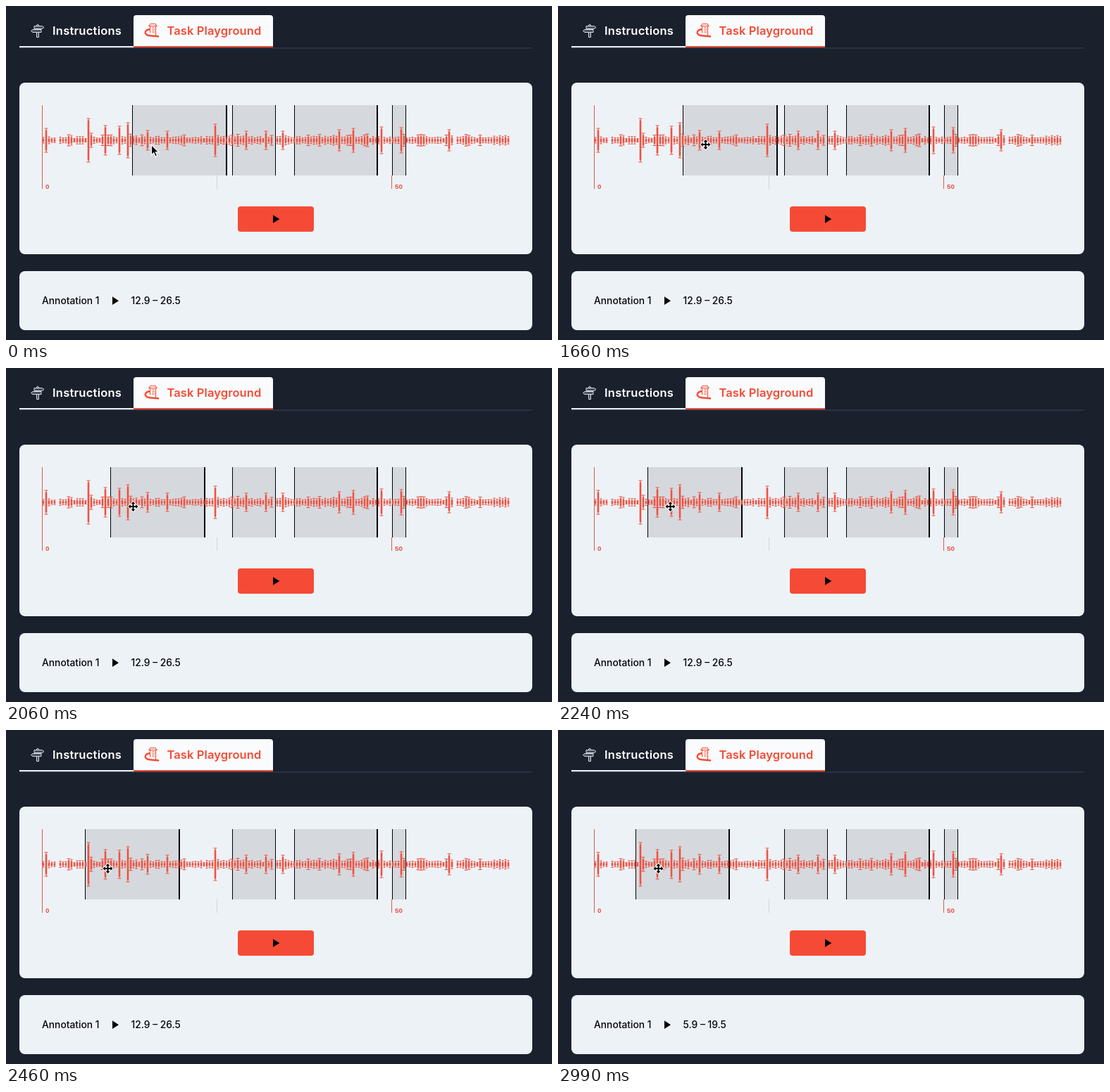
These frames come from a looping animation (775 by 475 pixels, 3.89 s). An HTML page:

```html
<!DOCTYPE html>
<html lang="en">
<head>
<meta charset="utf-8">
<title>Audio annotation</title>
<style>
  html, body { margin: 0; width: 100%; height: 100%; overflow: hidden; background: #1a202c; }
  svg { display: block; width: 100%; height: 100%; }
  text { font-family: Inter, sans-serif; }
  .tab { font-size: 16.5px; font-weight: 600; letter-spacing: .1px; }
  .note { font-size: 13.8px; font-weight: 500; fill: #05070b; }
  .tick { font: bold 9.8px "Liberation Sans", Arial, sans-serif; fill: #e85343; }
  .red { fill: #f54b36; }
  .panel { fill: #edf2f7; }
  .crisp { shape-rendering: crispEdges; }
</style>
</head>
<body>
<svg viewBox="0 0 775 475" xmlns="http://www.w3.org/2000/svg">
  <rect width="775" height="475" fill="#1a202c"/>

  <rect x="19" y="59" width="728" height="1.6" fill="#2d3748"/>
  <rect x="19" y="57" width="162" height="2" fill="#edf2f7"/>
  <path d="M181 57V17q0-4 4-4h190q4 0 4 4V57z" fill="#f9fbfc"/>
  <rect class="red" x="181" y="57" width="198" height="2"/>

  <g fill="#4a515d" stroke="#d3d9e0">
    <path d="M43.5 27q1.500-2 3 0V44.500h-3z"/>
    <path d="M40 28.500H51.500L54 30.500L51.500 32.500H40z"/>
    <path d="M50 33.500H38L35.500 35.500L38 37.500H50z"/>
  </g>
  <text class="tab" x="66" y="41" fill="#fff" letter-spacing=".25" style="letter-spacing:.25px">Instructions</text>

  <g fill="none" stroke="#f54b36">
    <path d="M203 28.500L205 25.500H212L214 28.500zM204.500 28.500V38M212.500 28.500V42M207 31H211M207 34H211M207 37H211" stroke-width="1.1"/>
    <path d="M205 33C197 33.500 195.500 39.500 201 41.500C206 43 211 42.500 217 43.500" stroke-width="2.4"/>
  </g>
  <text class="tab red" x="228.500" y="41">Task Playground</text>

  <rect class="panel" x="19" y="109" width="728" height="244" rx="8"/>
  <rect class="panel" x="19" y="377" width="728" height="84" rx="8"/>

  <g class="crisp">
    <rect x="51" y="141" width="1" height="119" fill="#dd5c4e"/>
    <rect x="299" y="241" width="1" height="19" fill="#cfd5dc"/>
    <rect x="547" y="241" width="1" height="19" fill="#dd5c4e"/>
    <path id="shade" fill="#000" fill-opacity=".1"/>
    <path id="edges"/>
  </g>
  <path id="wave" fill="#ee5241"/>
  <text class="tick" x="56" y="260">0</text>
  <text class="tick" x="552" y="260">50</text>

  <rect class="red" x="329" y="285" width="108" height="36" rx="4"/>
  <path d="M379 297.300L388.300 303L379 308.700z"/>

  <text class="note" x="51" y="424">Annotation 1</text>
  <path d="M151 413.300L160 419.200L151 425.100z"/>
  <text class="note" id="range" x="177.500" y="424"></text>

  <path id="arrow" d="M0 0V14.200L3.300 11.200L5.600 16.500L8 15.400L5.800 10.300H10.200z" transform="translate(206.500 197.500)" stroke="#fff" stroke-width="1.1"/>
  <path id="move" stroke="#fff" stroke-width="2" stroke-linejoin="round" paint-order="stroke"
    d="M0-7L3-3.800H1V-1H3.800V-3L7 0L3.800 3V1H1V3.800H3L0 7L-3 3.800H-1V1H-3.800V3L-7 0L-3.800-3V-1H-1V-3.800H-3z"/>
</svg>
<script>
const LOOP = 3890, HOVER = 1070, GRAB = 1660, RELEASE = 2640, DROP = 2990;
const MID = 191, FROM = 179, TO = 110;

const $ = id => document.getElementById(id);
const clamp = v => Math.min(1, Math.max(0, v));
const box = (x, y, w, h) => `M${x} ${y}h${w}v${h}h${-w}z`;
const noise = n => {
  const v = Math.sin(n * 12.9898) * 43758.5453;
  return v - Math.floor(v);
};

// The loudest bars; everything between them is seeded murmur.
const peaks = new Map([
  [57, 17], [117, 31], [141, 21], [161, 20], [173, 25], [201, 14], [229, 13], [297, 23],
  [341, 13], [369, 13], [393, 13], [473, 15], [493, 17], [533, 19], [561, 18], [629, 15]
]);

// Each bar is a rounded body on a thin stem with a cap at both ends.
function bar(x, h) {
  const body = Math.max(1.2, h - 3), cap = h < 7 ? 3 : 5;
  return box(x - cap / 2, MID - h - 0.5, cap, 1)
    + box(x - cap / 2, MID + h - 0.5, cap, 1)
    + box(x - 0.5, MID - h, 1, 2 * h)
    + `M${x - 1.3} ${MID - body}q1.3-2 2.600 0v${2 * body}q-1.300 2-2.600 0z`;
}

function drawWave() {
  let d = "";
  for (let x = 53; x <= 713; x += 4) {
    const murmur = 2 + 3.5 * noise(x) + 6 * noise(x + 1) ** 4;
    const h = peaks.get(x) || murmur;
    if (h > 2.4) d += bar(x, h);
  }
  $("wave").setAttribute("d", d);
}

// Eased drag, sampled at the pace of the screen updates.
function leftEdge(t) {
  if (t < GRAB) return FROM;
  const pace = 57.1, start = 1540;
  const sampled = GRAB + Math.floor((t - GRAB) / pace) * pace;
  const p = clamp((sampled - start) / (RELEASE - start));
  const ease = p * p / (p * p + (1 - p) * (1 - p));
  return Math.floor(FROM + (TO - FROM) * ease);
}

function pointer(t, left) {
  if (t >= GRAB) return [left + 32.5, 197];
  const p = clamp(Math.floor((t - HOVER) / 60) / 3);
  const ease = p * (2 - p);
  return [Math.round(208 + 4 * ease), Math.round(200 - 3 * ease)];
}

function render(t) {
  const left = leftEdge(t), dropped = t >= DROP;
  const regions = [
    { x: left, end: left + (dropped ? 134 : 135), edge: 2 },
    { x: 321, end: 383, edge: 1 },
    { x: 409, end: 528, edge: 2 },
    { x: 548, end: 568, edge: 1 }
  ];
  $("shade").setAttribute("d", regions.map(r => box(r.x, 141, r.end - r.x, 100)).join(""));
  $("edges").setAttribute("d", regions.map(r =>
    box(r.x, 141, 1, 100) + box(r.end - r.edge, 141, r.edge, 100)).join(""));
  $("range").textContent = dropped ? "5.9 – 19.5" : "12.9 – 26.5";

  const hover = t >= HOVER;
  $("arrow").style.display = hover ? "none" : "";
  $("move").style.display = hover ? "" : "none";
  $("move").setAttribute("transform", `translate(${pointer(t, left)})`);
}

drawWave();
const start = performance.now();
function tick() {
  render((performance.now() - start) % LOOP);
  requestAnimationFrame(tick);
}
tick();
</script>
</body>
</html>
```
